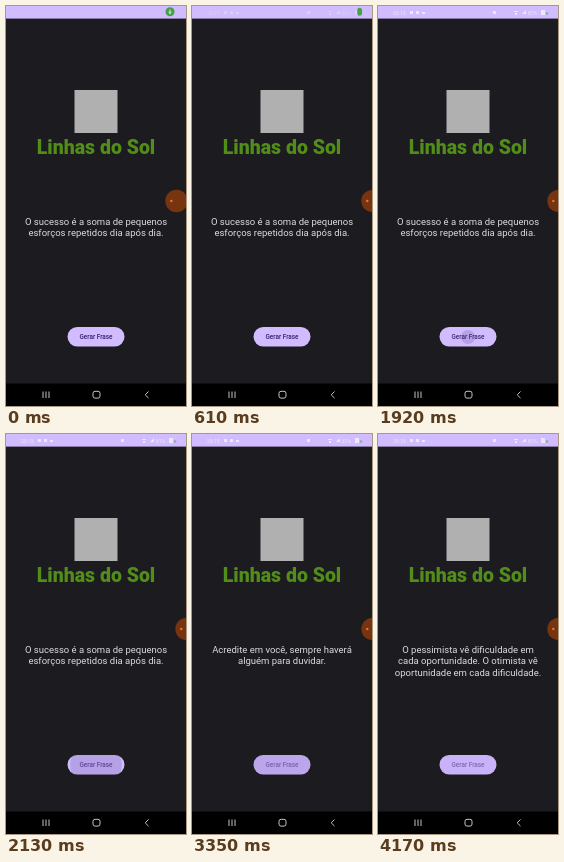
Write an HTML page that moves like this. It is 180x400 px and loops after 4660 ms.

```html
<!DOCTYPE html>
<html lang="pt">
<head>
<meta charset="utf-8">
<style>
html, body { margin: 0; width: 100%; height: 100%; overflow: hidden; background: #1c1b1f; }
svg { display: block; width: 100%; height: 100%; font-family: Roboto, sans-serif; }
</style>
</head>
<body>
<svg viewBox="0 0 180 400">
  <defs><clipPath id="pill"><rect x="61.5" y="321" width="57" height="19.5" rx="9.75"/></clipPath></defs>
  <rect width="180" height="400" fill="#1c1b1f"/>
  <rect width="180" height="12.6" fill="#d0bcff"/>

  <g id="status" fill="#f4eeff" font-size="5" opacity="0">
    <text x="15" y="8.5">20:15</text>
    <path d="M32 5h3v3h-3zM38 5h3v3h-3zM44 6h3v2h-3zM115 5h3v3h-3zM136 5h4v1h-4zM137 7h2v2h-2zM144 8l4-4v4zM163 4h4v5h-4z"/>
    <text x="150" y="8.5">81%</text>
  </g>
  <rect id="mic" fill="#43a047"/>
  <path id="micMark" d="M164 3.5v3M162.5 6q1.5 2 3 0M164 7v1.3" fill="none" stroke="#e6f4e4" stroke-width=".9"/>

  <rect x="68.5" y="84" width="43" height="43" fill="#b0b0b0"/>
  <text x="90" y="148" font-size="19.5" font-weight="900" fill="#518d18" text-anchor="middle">Linhas do Sol</text>

  <g id="bubble">
    <circle cx="170.5" cy="195" r="11.2" fill="#78340f"/>
    <circle cx="165.3" cy="195" r="1.2" fill="#d07a50"/>
  </g>

  <g id="quote" font-size="9.5" fill="#dedbe0" text-anchor="middle"></g>

  <g clip-path="url(#pill)">
    <rect x="61" y="321" width="58" height="20" fill="#d0bcff"/>
    <circle id="ripple" cx="90" cy="331" fill="#381e72"/>
    <text id="label" x="90" y="333.1" font-size="6.4" font-weight="500" fill="#381e72" text-anchor="middle">Gerar Frase</text>
  </g>

  <rect y="377.5" width="180" height="22.5" fill="#000"/>
  <g fill="none" stroke="#c4c4c4">
    <path d="M37 385.5v6.5M40 385.5v6.5M43 385.5v6.5M142.5 385.5l-3.3 3.3 3.3 3.3"/>
    <rect x="87" y="385.3" width="7" height="6.8" rx="2"/>
  </g>
</svg>
<script>
const LOOP = 4660;
const quotes = [
  ["O sucesso é a soma de pequenos", "esforços repetidos dia após dia."],
  ["Acredite em você, sempre haverá", "alguém para duvidar."],
  ["O pessimista vê dificuldade em", "cada oportunidade. O otimista vê", "oportunidade em cada dificuldade."]
];
const $ = id => document.getElementById(id);
const set = (id, attrs) => { for (const k in attrs) $(id).setAttribute(k, attrs[k]); };
const mix = (a, b, p) => a + (b - a) * p;
const ease = p => 1 - (1 - p) ** 2;

// Progress from a to b in n visible steps
const steps = (t, a, b, n) => t < a ? 0 :
  Math.min(1, (Math.floor((t - a) / (b - a) * (n - 1) + 1e-6) + 1) / n);

let shown = -1;
function showQuote(i) {
  if (i === shown) return;
  shown = i;
  $("quote").innerHTML = quotes[i]
    .map((line, n) => `<text x="90" y="${219.3 + n * 11.15}">${line}</text>`).join("");
}

function draw(t) {
  const dock = ease(steps(t, 20, 490, 12));
  const icons = steps(t, 610, 1110, 12);

  set("bubble", { transform: `translate(${10 * dock})` });

  const w = mix(mix(9, 5, dock), 2.5, icons), h = mix(mix(9, 8.5, dock), 2.5, icons);
  const x = mix(mix(164, 167.5, dock), 169, icons), y = mix(5.7, 7.5, icons);
  set("mic", { x: x - w / 2, y: y - h / 2, width: w, height: h, rx: w / 2,
    opacity: t < 1320 ? mix(1, .7, icons) : .5 });
  set("micMark", { opacity: 1 - dock });
  set("status", { opacity: t < 610 ? 0 : mix(.3, .85, icons) });

  const first = steps(t, 1920, 2230, 8), second = steps(t, 3350, 3670, 8);
  const release = second ? (t >= 3910 ? .3 : 0) + .4 * steps(t, 4090, 4170, 4) : t >= 2680 ? .2 : 0;
  const tint = .17 * (1 - release);
  set("ripple", {
    r: 30 * ease(first),
    opacity: second ? mix(.136, tint, second) : tint
  });
  set("label", { opacity: mix(1, .5, first) });

  showQuote(t < 2230 ? 0 : t < 3670 ? 1 : 2);
}

const start = performance.now();
function frame() {
  draw((performance.now() - start) % LOOP);
  requestAnimationFrame(frame);
}
frame();
</script>
</body>
</html>
```
